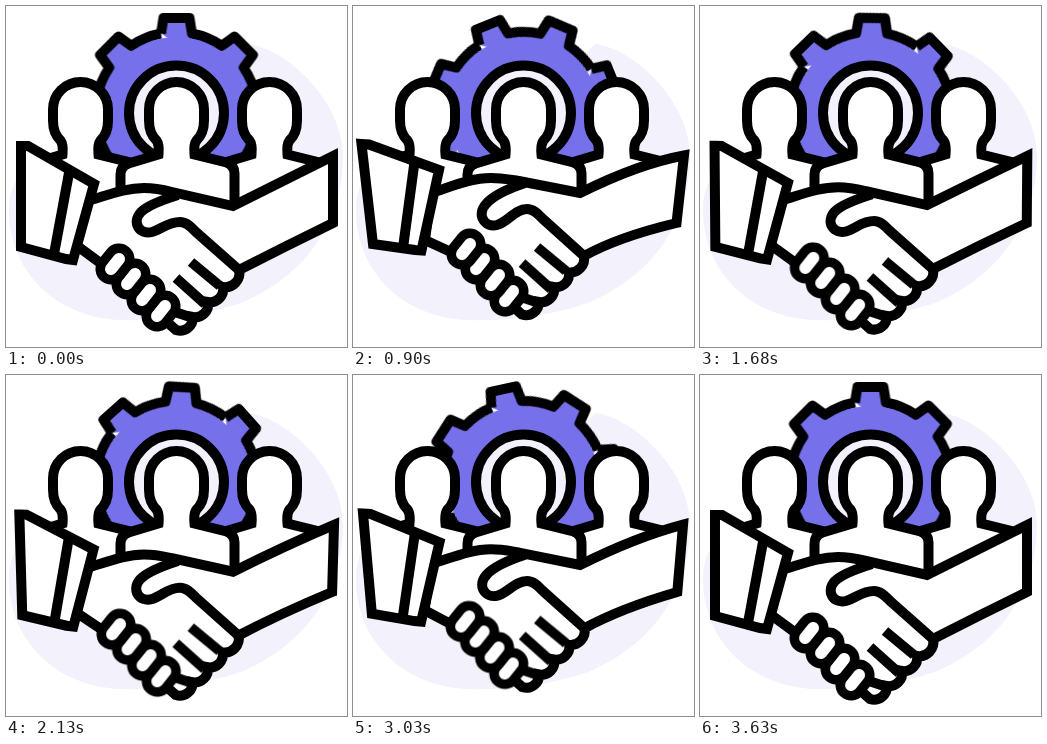
These frames come from a looping animation (341 px wide and 341 px high, 3660 ms). An HTML page without scripts:

```html
<!DOCTYPE html>
<html lang="en">
<head>
<meta charset="utf-8">
<title>Handshake</title>
<style>
  html, body { margin: 0; height: 100%; overflow: hidden; background: #fff; }
  svg { display: block; width: 100vw; height: 100vh; }
  .ink { fill: #fff; stroke: #000; stroke-width: 10; }
  .line { fill: none; }

  .gear, .hands, .thumb, .sleeve, .seam, .lift {
    animation: .915s cubic-bezier(.333, 0, .667, 1) infinite alternate;
  }
  .gear { animation-name: turn; animation-duration: 1.83s; }
  .hands { animation-name: hands; }
  .thumb { animation-name: thumb; }
  .sleeve { animation-name: sleeve; }
  .seam { animation-name: seam; }
  .lift { animation-name: lift; }

  @keyframes turn { to { transform: rotate(-45deg); } }
  @keyframes lift { to { transform: translate(var(--x, 0px), -15px); } }
  @keyframes hands {
    to { d: path("M78 187C100 180 118 172 138 172C150 172 158 174 166 175L227 187Q285 158 331 149.5L323.5 217Q265 231 231 250A14 14 0 0 1 216 266.5A13 13 0 0 1 201 281A13 13 0 0 1 186 296A13 13 0 0 1 169 308.5L100 247L72 234Z"); }
  }
  @keyframes thumb {
    to { d: path("M172 177C154 183 139 191 133 198C123 209 132 222 144 219C155 216 162 203 174 203C181 203 186 209 190 213L231 250"); }
  }
  @keyframes sleeve {
    to { d: path("M8.5 138L16 138.5L86 164L68.5 244.5L62 244L20 238Z"); }
  }
  @keyframes seam { to { d: path("M61.5 156L50 242"); } }
</style>
</head>
<body>
<svg viewBox="0 0 341 341">
  <defs>
    <path id="teeth" d="M-15.5-79.5L-13-95H13L15.5-79.5A81 81 0 0 1 45.3-67.2L58-76.4L76.4-58L67.2-45.3A81 81 0 0 1 79.5-15.5"/>
    <path id="person" d="M-56 90V65Q-56 57-48 54L-18 45Q-17 35-20 31Q-27.5 24-27.5 11V0A27.5 27.5 0 0 1 27.5 0V11Q27.5 24 20 31Q17 35 18 45L50 53Q58 56 58 64V92"/>
    <g id="finger" stroke-linecap="round">
      <path d="M-4 5L4-5" stroke="#000" stroke-width="31"/>
      <path d="M-4 5L4-5" stroke="#fff" stroke-width="12"/>
    </g>
  </defs>

  <path fill="#f3f2fc" d="M242 38C280 42 337 95 337 150C337 215 300 270 235 297C190 312 150 315 115 314C50 312 3 265 3 205C3 130 90 160 150 130Z"/>

  <g transform="translate(170.5 107)">
    <g class="gear" fill="#7670ea" stroke="#000" stroke-width="10" stroke-linejoin="round">
      <use href="#teeth"/>
      <use href="#teeth" transform="rotate(90)"/>
      <use href="#teeth" transform="rotate(180)"/>
      <use href="#teeth" transform="rotate(270)"/>
      <circle r="76" stroke="none"/>
    </g>
    <circle r="47.5" fill="#f3f2fc" stroke="#000" stroke-width="10"/>
  </g>

  <g class="ink">
    <use href="#person" x="74.5" y="103.5"/>
    <use href="#person" x="263.5" y="103.5"/>
    <use href="#person" x="170.5" y="103.5"/>
  </g>

  <g class="ink">
    <path class="hands" d="M78 196C100 190 118 182 138 182C150 182 158 184 166 186L227 200Q277 175 327 150L327 217Q280 240 233 264A14 14 0 0 1 217 281A13 13 0 0 1 202 296A13 13 0 0 1 187 311A13 13 0 0 1 170 324L97 259L70 239Z"/>
    <path class="thumb line" d="M172 189C156 194 142 199 135 206C125 217 134 229 146 226C156 223 162 216 174 216C181 216 186 222 190 226L233 264"/>
    <path class="lift line" style="--x:-1px" d="M185 256L214 280M170 272L199 298M166 305L187 312"/>
  </g>

  <g transform="translate(155 305)"><use class="lift" style="--x:1px" href="#finger"/></g>
  <g transform="translate(140 289)"><use class="lift" style="--x:2px" href="#finger"/></g>
  <g transform="translate(125 273)"><use class="lift" style="--x:2px" href="#finger"/></g>
  <g transform="translate(109 258)"><use class="lift" style="--x:4px" href="#finger"/></g>

  <g class="ink">
    <path class="sleeve" d="M15 140L22 140L88 178L67 254L60 253L15 241Z"/>
    <path class="seam line" d="M63 167L48 248"/>
  </g>
</svg>
</body>
</html>
```
